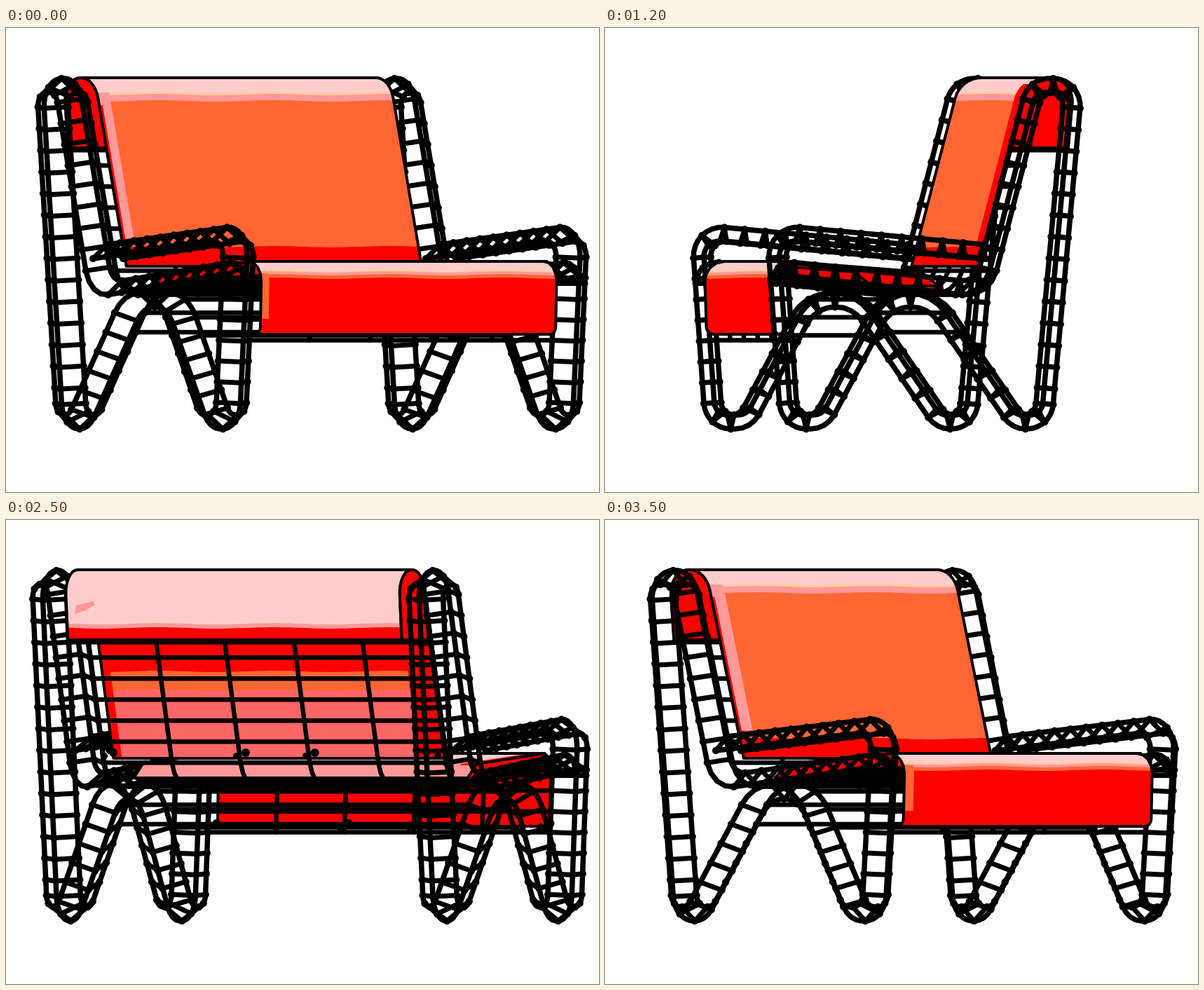
Write an HTML page with a canvas that moves like this. It is 846 by 662 pixels and loops after 3600 ms.

```html
<!DOCTYPE html>
<html>
<head>
<meta charset="utf-8">
<title>Turning chair</title>
<style>
html, body { margin: 0; width: 100%; height: 100%; overflow: hidden; background: #fff; }
canvas { display: block; }
</style>
</head>
<body>
<canvas id="stage" width="846" height="662"></canvas>
<script>
const g = document.getElementById('stage').getContext('2d');
const RED = '#f00', ORANGE = '#f63', ROSE = '#f66', PINK = '#f99', PALE = '#fcc', PEACH = '#fc9';
const AXIS = 423, SIDE = 310, RAIL = 28, DEPTH = 20, CUSHION = 275, STEP = 31;
let c, s, near;

// Profile points are [z, y, corner radius]; z points to the front of the chair.
function trace(corners) {
  const out = [];
  const add = (z, y, a, seg, node) =>
    out.push({ z, y, seg, node, iz: z - DEPTH * Math.sin(a), iy: y + DEPTH * Math.cos(a) });
  let [z, y] = corners[0];
  for (let i = 1; i < corners.length; i++) {
    const [pz, py] = corners[i - 1], [cz, cy, r = 0] = corners[i], next = corners[i + 1];
    const a = Math.atan2(cy - py, cz - pz);
    if (i === 1) add(z, y, a, i, true);
    let turn = 0;
    if (next) {
      turn = Math.atan2(next[1] - cy, next[0] - cz) - a;
      turn = Math.atan2(Math.sin(turn), Math.cos(turn));
    }
    const cut = r * Math.tan(Math.abs(turn) / 2);
    const tz = cz - cut * Math.cos(a), ty = cy - cut * Math.sin(a);
    const n = Math.round(Math.hypot(tz - z, ty - y) / STEP);
    for (let k = 1; k <= n; k++) add(z + (tz - z) * k / n, y + (ty - y) * k / n, a, i, true);
    if (!n) add(tz, ty, a, i, false);
    z = tz; y = ty;
    if (!r) continue;
    const bend = Math.sign(turn) * r;
    const oz = tz - bend * Math.sin(a), oy = ty + bend * Math.cos(a);
    const m = 4 * Math.max(1, Math.round(r * Math.abs(turn) / STEP));
    for (let k = 1; k <= m; k++) {
      const b = a + turn * k / m;
      z = oz + bend * Math.sin(b);
      y = oy - bend * Math.cos(b);
      add(z, y, b, i, k % 4 === 0);
    }
  }
  return out;
}

const frame = trace([
  [-64, 309], [250, 280, 41], [229, 572, 39], [163, 572, 39], [69, 398, 46], [16, 398, 46],
  [-105, 572, 38], [-162, 572, 38], [-167, 515], [-208, 72, 39], [-129, 72, 39], [-53, 363, 26],
  [243, 331, 30], [243, 352]
]);
const part = test => frame.filter(test);
const headBars = part(p => p.seg === 9 && p.iy < 185);
const backMesh = part(p => p.seg === 11 && p.iy > 150);
const seatMesh = part(p => p.seg === 12);
const frontMesh = part(p => p.seg === 2 && p.iy > 340 && p.iy < 450);
const underBars = part(p => p.seg > 3 && p.seg < 7 && p.iy < 442);

const back = trace([[-63, 340], [-134, 71, 39], [-165, 71]]);
const flap = trace([[-165, 71], [-202, 71, 33], [-193, 171]]);
const front = trace([[205, 333], [237, 333, 28], [234, 437, 11], [220, 437]]);
const seat = [{ z: 215, y: 333 }, { z: 20, y: 348 }, { z: -5, y: 368 }];
const seatSide = [...seat, { z: -5, y: 374 }, { z: 215, y: 353 }];
const headSide = [...back.filter(p => p.y < 150), ...flap, { z: -110, y: 171 }];

const px = (X, z) => AXIS + X * c - z * s;

function line(points, width, fill) {
  g.beginPath();
  points.forEach(([x, y]) => g.lineTo(x, y));
  if (fill) {
    g.closePath();
    g.fillStyle = fill;
    g.fill();
  }
  if (width) {
    g.lineWidth = width;
    g.stroke();
  }
}
const outer = (prof, X) => prof.map(p => [px(X, p.z), p.y]);
const inner = (prof, X) => prof.map(p => [px(X, p.iz), p.iy]);
const swept = (prof, X0, X1) => [...outer(prof, X0), ...outer(prof, X1).reverse()];

function dot(x, y, r) {
  g.beginPath();
  g.arc(x, y, r, 0, 7);
  g.fillStyle = '#000';
  g.fill();
}

// Two inner rails and one outer rail, joined by V-shaped rungs.
function truss(X) {
  line(outer(frame, X), 7.5);
  for (const d of [-RAIL, RAIL]) line(inner(frame, X + d), 7.5);
  for (const p of frame) if (p.node) {
    const rung = [[px(X - RAIL, p.iz), p.iy], [px(X, p.z), p.y], [px(X + RAIL, p.iz), p.iy]];
    line(rung, 7);
    for (const [x, y] of rung) dot(x, y, 5.2);
  }
}

function bars(prof) {
  for (const p of prof) if (p.node) line([[px(-282, p.iz), p.iy], [px(282, p.iz), p.iy]], 6.5);
}
function mesh(prof) {
  bars(prof);
  for (const X of [-170, -57, 57, 170]) line(inner(prof, X), 6.5);
}

// Bands are [start y, colour]; strips are [side, width, colour, y0, y1].
function sheet(prof, bands, strips = []) {
  const shape = swept(prof, -CUSHION, CUSHION);
  g.save();
  line(shape, 0, bands[0][1]);
  g.clip();
  for (const [y, color] of bands.slice(1)) {
    const edge = [[846, 662], [0, 662]];
    for (let x = 0; x <= 846; x += 9) edge.push([x, y + Math.sin((x - AXIS) / 26)]);
    line(edge, 0, color);
  }
  for (const [side, width, color, y0, y1] of strips) {
    const inset = Math.min(width / Math.max(Math.abs(c), .01), 90);
    g.save();
    g.beginPath();
    g.rect(0, y0, 846, y1 - y0);
    g.clip();
    line(swept(prof, side * CUSHION, side * (CUSHION - inset)), 0, color);
    g.restore();
  }
  g.restore();
  line([...shape, shape[0]], 4);
}

function hooks(z, y) {
  for (const X of [-CUSHION, -57, 57, CUSHION]) {
    dot(px(X, z) - 5 * c, y - 3, 6);
    dot(px(X, z) + 10 * c, y + 2, 5);
  }
}

function fromFront() {
  const edge = Math.min(27 * Math.abs(s), 64 * c);
  sheet(flap, [[0, RED]]);
  bars(headBars);
  mesh(backMesh);
  sheet(back,
    [[0, PALE], [92, PEACH], [95, PINK], [104, ORANGE], [312, RED]],
    near < 0 ? [[-1, edge, PINK, 92, 300], [-1, 5, RED, 110, 340]] : [[1, edge, RED, 80, 340]]);
  bars(underBars);
  line(outer(seatSide, near * CUSHION), 3, RED);
  sheet(seat, [[0, RED]]);
  mesh(seatMesh);
  mesh(frontMesh);
  sheet(front,
    [[0, PALE], [346, PEACH], [348, PINK], [352, ORANGE], [357, RED]],
    near < 0 ? [[-1, 18 * Math.abs(s), ORANGE, 350, 415]] : []);
}

function fromBehind() {
  sheet(front, [[0, RED]]);
  mesh(frontMesh);
  hooks(222, 436);
  bars(underBars);
  mesh(seatMesh);
  line(outer(seatSide, near * CUSHION), 3, RED);
  sheet(seat, [[0, PALE], [346, PINK]], [[near, 22, RED, 330, 350]]);
  sheet(back,
    [[0, RED], [216, ORANGE], [243, ROSE]],
    [[near, 40, RED, 70, 342], [-near, 12, RED, 70, 342]]);
  mesh(backMesh);
  hooks(-72, 335);
  bars(headBars);
  sheet(flap, [[0, PALE], [148, PINK], [154, RED]]);
  const x = px(248, -196);
  line([[x + 14 * c, 134], [x + 12 * c, 122], [x - 16 * c, 116], [x - 19 * c, 121], [x - 4 * c, 129]], 0, PINK);
}

function draw(now) {
  const turn = (Math.floor(now / 100) % 36 * 10 - 40) * Math.PI / 180;
  c = Math.cos(turn);
  s = Math.sin(turn);
  near = s < 0 ? -1 : 1;
  g.fillStyle = '#fff';
  g.fillRect(0, 0, 846, 662);
  g.strokeStyle = '#000';
  g.lineCap = g.lineJoin = 'round';
  truss(-near * SIDE);
  if (c > 0) fromFront(); else fromBehind();
  line(outer(headSide, near * CUSHION), 0, RED);
  line(outer(headSide.slice(-2), near * CUSHION), 4);
  line(outer(back, near * CUSHION), 4);
  line(outer(flap, near * CUSHION), 4);
  truss(near * SIDE);
}

const start = performance.now();
function tick() {
  draw(performance.now() - start);
  requestAnimationFrame(tick);
}
tick();
</script>
</body>
</html>
```
